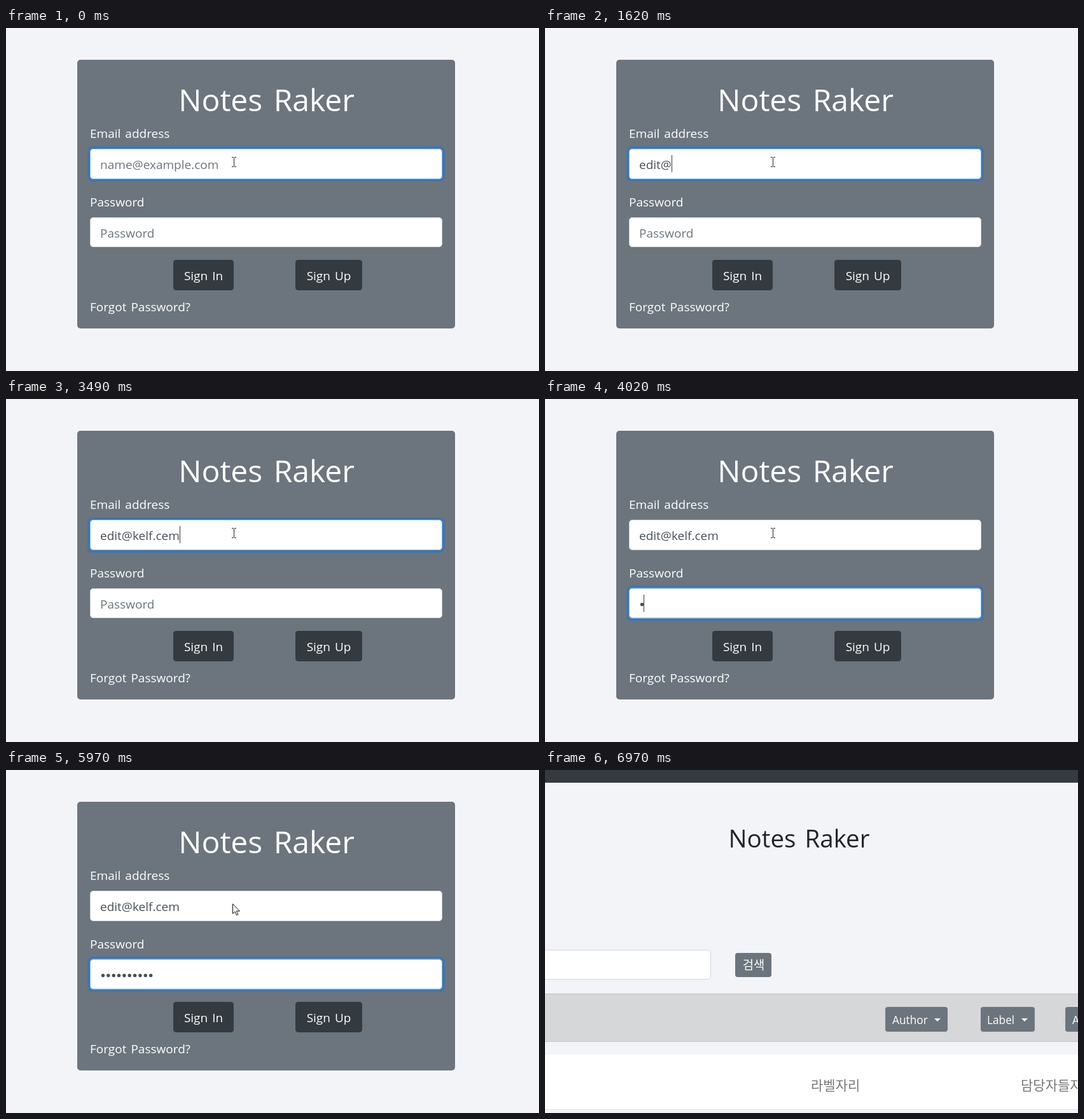
An HTML page that plays this animation: 838x540 px, repeating every 7.6 s.

```html
<!DOCTYPE html>
<html lang="en">
<head>
<meta charset="utf-8">
<title>Sign in</title>
<style>
  html, body { margin: 0; width: 100%; height: 100%; overflow: hidden; background: #f3f4f8; }
  svg { display: block; width: 838px; height: 540px; }
  text { font: 19px "Open Sans", "Noto Sans", sans-serif; word-spacing: 2px; fill: #fff; }
  .mid { text-anchor: middle; }
  .title { font-size: 48px; word-spacing: 5px; }
  .heading { font-size: 38.5px; word-spacing: 4px; fill: #212529; }
  .hint { fill: #6c757d; }
  .typed { fill: #495057; }
  .small { font-size: 17.3px; }
  .ko { font-family: "Noto Sans CJK KR", "Noto Sans CJK", sans-serif; font-size: 18.8px; }
  .cell { font-size: 21px; fill: #777; }
  .card, .grey { fill: #6c757d; }
  .dark { fill: #343a40; }
  .field { fill: #fff; stroke: #ced4da; }
  .glow { fill: none; stroke: #0073f0; stroke-opacity: .36; stroke-width: 4; }
  .ring { fill: none; stroke: #80bdff; }
  .caret { fill: #343a40; }
</style>
</head>
<body>
<svg viewBox="0 0 838 540">
  <defs>
    <g id="focus">
      <rect class="glow" x="130" y="188" width="558" height="52" rx="6"/>
      <rect class="ring" x="132.5" y="190.5" width="553" height="47" rx="4.5"/>
    </g>
    <path id="drop" d="M0 0h10l-5 5z" fill="#fff"/>
  </defs>

  <g id="login">
    <rect class="card" x="112" y="50" width="594" height="423" rx="5"/>
    <text class="title mid" x="409.5" y="131">Notes Raker</text>
    <text x="132" y="173">Email address</text>
    <rect class="field" x="132.5" y="190.5" width="553" height="47" rx="4.5"/>
    <use id="emailFocus" href="#focus"/>
    <text id="emailHint" class="hint" x="148" y="222">name@example.com</text>
    <text id="email" class="typed" x="148" y="222"></text>
    <rect id="emailCaret" class="caret" y="200" width="1" height="27"/>

    <text x="132" y="281">Password</text>
    <rect class="field" x="132.5" y="298.5" width="553" height="46" rx="4.5"/>
    <use id="passFocus" href="#focus" y="107.5"/>
    <text id="passHint" class="hint" x="148" y="330">Password</text>
    <g id="dots" class="typed"></g>
    <rect id="passCaret" class="caret" y="308" width="1" height="27"/>

    <rect class="dark" x="263" y="365" width="95" height="48" rx="4.5"/>
    <text class="mid" x="310.5" y="397">Sign In</text>
    <rect class="dark" x="455" y="365" width="105" height="48" rx="4.5"/>
    <text class="mid" x="507.5" y="397">Sign Up</text>
    <text x="132" y="446">Forgot Password?</text>
  </g>

  <g id="list">
    <rect class="dark" width="838" height="20"/>
    <text class="heading mid" x="399.5" y="122">Notes Raker</text>
    <rect class="field" x="-20" y="283.5" width="280.5" height="46" rx="4.5"/>
    <rect class="grey" x="299" y="288" width="57" height="38" rx="4"/>
    <text class="ko mid" x="328" y="313.5">검색</text>

    <rect x="-2" y="352.5" width="842" height="75" fill="#d6d7d8" stroke="#c1c3c5"/>
    <rect class="grey" x="535" y="373" width="98" height="39" rx="4"/>
    <text class="small" x="546" y="400">Author</text>
    <use href="#drop" x="612" y="391"/>
    <rect class="grey" x="685" y="373" width="85" height="39" rx="4"/>
    <text class="small" x="695" y="400">Label</text>
    <use href="#drop" x="749" y="391"/>
    <rect class="grey" x="818" y="373" width="110" height="39" rx="4"/>
    <text class="small" x="829" y="400">Assignee</text>

    <rect y="448" width="838" height="86" fill="#fff"/>
    <rect y="534" width="838" height="1" fill="#dee2e6"/>
    <text class="ko cell" x="418" y="503.5">라벨자리</text>
    <text class="ko cell" x="748" y="503.5">담당자들자리</text>
  </g>

  <path id="beam" d="M355 203.5h2.5l1 1 1-1h2.5M358.5 204v14M355 218.5h2.5l1-1 1 1h2.5" fill="none" stroke="#222"/>
  <path id="arrow" d="M.5 .8V16.2l3.5-3.3 2.5 5.6 2.4-1-2.4-5.4h5z" fill="#fff" stroke="#111"/>
</svg>
<script>
const LOOP = 7600;
const ADDRESS = 'edit@kelf.cem';
const PITCH = 8.35;

// Each table holds [start time in ms, value].
const typing = [[0, 0], [690, 1], [770, 2], [930, 3], [1070, 4], [1620, 5], [2030, 7], [2320, 8],
  [2390, 9], [3010, 10], [3160, 11], [3260, 12], [3490, 13]];
const secret = [[0, 0], [4020, 1], [4100, 2], [4250, 3], [4410, 4], [4490, 5], [4570, 6],
  [4880, 7], [5120, 8], [5260, 9], [5490, 10]];
const focusShift = [[0, 0], [3630, 1 / 3], [3700, 2 / 3], [3780, 1]];
const emailBlink = [[0, 0], [230, 1], [2930, 0], [3010, 1], [3630, 0]];
const passBlink = [[0, 0], [3630, 1], [5970, 0]];
const pointer = [[0, 'beam'], [5800, [356, 210]], [6120, 'beam'], [6820, [550, 346]],
  [6900, [743, 483]], [6970, null]];

const $ = id => document.getElementById(id);
const at = (table, t) => table.findLast(([start]) => start <= t)[1];
const show = (id, on) => { $(id).style.visibility = on ? 'visible' : 'hidden'; };

const dots = Array.from({ length: 10 }, (_, i) => {
  const dot = document.createElementNS('http://www.w3.org/2000/svg', 'circle');
  dot.setAttribute('cx', 152.5 + PITCH * i);
  dot.setAttribute('cy', 323.5);
  dot.setAttribute('r', 2.7);
  return $('dots').appendChild(dot);
});

function draw(t) {
  const onLogin = t < 6120;
  $('login').style.display = onLogin ? '' : 'none';
  $('list').style.display = onLogin ? 'none' : '';

  if (onLogin) {
    const letters = at(typing, t);
    const email = $('email');
    email.textContent = ADDRESS.slice(0, letters);
    show('emailHint', !letters);
    const width = letters ? email.getComputedTextLength() : 0;
    $('emailCaret').setAttribute('x', Math.round(148.5 + width));
    show('emailCaret', at(emailBlink, t));

    const count = at(secret, t);
    dots.forEach((dot, i) => { dot.style.display = i < count ? '' : 'none'; });
    show('passHint', !count);
    $('passCaret').setAttribute('x', count ? Math.round(146.8 + PITCH * count) : 149);
    show('passCaret', at(passBlink, t));

    const shift = at(focusShift, t);
    $('emailFocus').style.opacity = 1 - shift;
    $('passFocus').style.opacity = shift;
  }

  const place = at(pointer, t);
  show('beam', place === 'beam');
  show('arrow', Array.isArray(place));
  if (Array.isArray(place)) $('arrow').setAttribute('transform', `translate(${place})`);
}

const began = performance.now();
function tick() {
  draw((performance.now() - began) % LOOP);
  requestAnimationFrame(tick);
}
tick();
</script>
</body>
</html>
```
